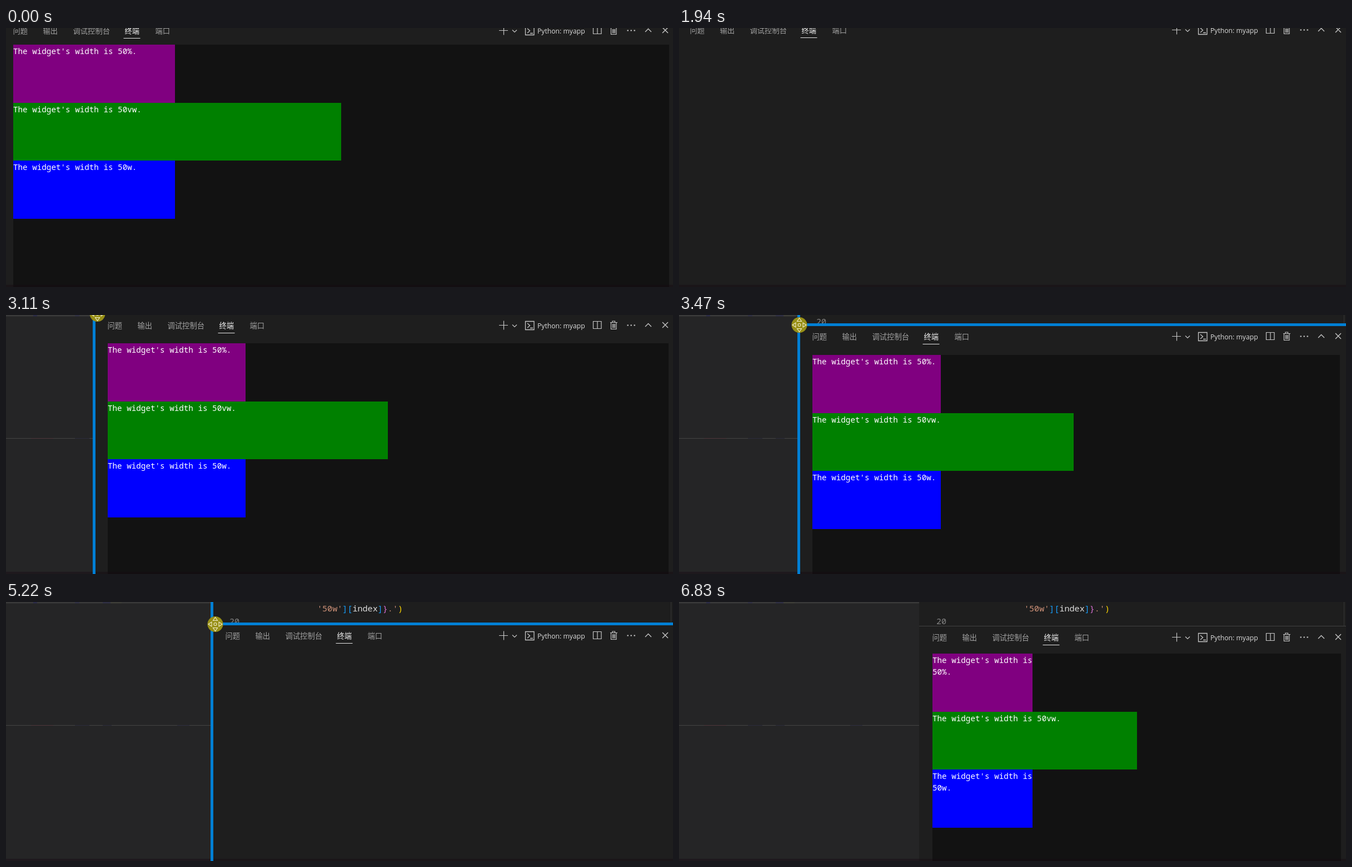
An HTML page that plays this animation: 1200x467 px, repeating every 7.89 s.

```html
<!DOCTYPE html>
<html lang="zh">
<head>
<meta charset="utf-8">
<style>
html, body { margin: 0; width: 100%; height: 100%; overflow: hidden; background: #1e1e1e; }
svg { display: block; width: 1200px; height: 467px; }
text { white-space: pre; }
.tab { font: 13.3px "Noto Sans CJK SC", "Noto Sans CJK", sans-serif; fill: #a0a0a0; }
.tab.on { fill: #f0f0f0; }
.label { font: 12.2px "Open Sans", "Noto Sans", sans-serif; fill: #dcdcdc; }
.term { font: 14.25px "Noto Sans Mono", monospace; fill: #fff; }
.code { font: 15.1px "Noto Sans Mono", monospace; fill: #dcdcdc; }
.num { fill: #858585; }
.str { fill: #ce9178; } .blue { fill: #179fff; } .pink { fill: #da70d6; } .gold { fill: #ffd700; }
.icon { fill: none; stroke: #c5c5c5; stroke-width: 1.2; }
.sash { fill: #007fd4; }
</style>
</head>
<body>
<svg viewBox="0 0 1200 467">
  <defs><clipPath id="sideClip"><rect id="sideBox" height="467"/></clipPath></defs>
  <rect width="1200" height="467" fill="#1e1e1e"/>
  <g id="side" clip-path="url(#sideClip)">
    <rect width="1200" height="467" fill="#252526"/>
  </g>
  <rect x="1196" width="1" height="60" fill="#353535"/>
  <g id="editor" class="code">
    <text id="lineNo" class="num" x="31.5">20</text>
    <text id="code" x="189.5" y="17"><tspan id="head"><tspan class="str">'50w'</tspan><tspan class="blue">]</tspan></tspan><tspan class="blue">[</tspan>index<tspan class="blue">]</tspan><tspan class="pink">}</tspan><tspan class="str">.'</tspan><tspan class="gold">)</tspan></text>
  </g>
  <g id="panel">
    <rect x=".5" width="1300" height="600" fill="#1e1e1e"/>
    <rect x=".5" width="1300" height="1" fill="#414141"/>
    <g id="tabs"></g>
    <rect x="223" y="34" width="30" height="1" fill="#e7e7e7"/>
  </g>
  <g id="tools" class="icon">
    <path d="M887 20.5h16M895.5 12.5v16M911 19.5l4 4l4-4"/>
    <path d="M934.5 13.5h15.5v15h-15.5zM938 17l4.5 4l-4.5 4M943 25.5h5" stroke-width="1.3"/>
    <path d="M1056.5 13.5h14.5v13h-14.5zM1064 13.5v13"/>
    <path d="M1087 15.5h13M1091 15v-2h4.5v2M1088.5 16v11.5h9.5v-11.5M1091.5 18v7.5M1093.5 18v7.5M1095.5 18v7.5"/>
    <path d="M1150 23l5.500-5.500l5.500 5.500M1181 15l10 10M1191 15l-10 10" stroke-width="1.4"/>
    <path d="M1117.5 20.5h2.5M1123.5 20.5h2.5M1129.5 20.5h2.5" stroke-width="2.2"/>
    <text class="label" x="956" y="26" stroke="none">Python: myapp</text>
  </g>
  <g id="term" class="term"><rect id="screen" fill="#121212"/></g>
  <rect y="463" width="1200" height="4" fill="#140810" opacity=".4"/>
  <g id="sashes" class="sash">
    <rect id="sashX" width="5" height="467"/>
    <rect id="sashY" width="1300" height="5"/>
  </g>
  <g id="cursor">
    <circle r="14" fill="#978f16"/>
    <g id="move" fill="none" stroke="#f0eccb" stroke-width="1.1">
      <circle r="2.5"/>
    </g>
    <path id="beam" d="M-3-8q3 0 3 2v12q0 2-3 2M3-8q-3 0-3 2M0 6q0 2 3 2" fill="none" stroke="#fff" stroke-width="1.2"/>
  </g>
</svg>
<script>
const LOOP = 7890, STEP = 40, CELL = 8.55, ROW = 20.93, RIGHT = 1194.5;
const $ = id => document.getElementById(id);

function add(parent, tag, attrs, text) {
  const el = document.createElementNS("http://www.w3.org/2000/svg", tag);
  set(el, attrs);
  if (text) el.textContent = text;
  return parent.appendChild(el);
}
function set(el, attrs) {
  for (const k in attrs) el.setAttribute(k, attrs[k]);
}
const show = (el, on) => el.style.display = on ? "" : "none";
const place = (el, x, y) => el.setAttribute("transform", `translate(${x} ${y})`);

// time, panel left, panel top
const DRAG = [
  [0, -11.5, -16], [1900, -11.5, -16], [1940, -5, -17], [2140, 16.5, -17],
  [2310, 16.5, -17], [2750, 57.5, -17], [3110, 158, -2], [3470, 215.5, 18],
  [4000, 215.5, 18], [4160, 298, 31], [4490, 298, 31], [4610, 327.5, 36],
  [4890, 365, 40], [5180, 365, 40], [5660, 431.5, 43], [LOOP, 431.5, 43]
];
// spans in which the terminal is cleared
const BLANK = [[1940, 2060], [2350, 2470], [2870, 2990], [3150, 3230],
  [4040, 4120], [4530, 4770], [5220, 5340]];

// content
[["问题", 0], ["输出", 54], ["调试控制台", 108], ["终端", 201], ["端口", 256]].forEach(([name, x]) =>
  add($("tabs"), "text", { class: name === "终端" ? "tab on" : "tab", x: 24 + x, y: 26 }, name));

[["#3a3a3a", 0, 49, 0], ["#2d2d48", 49, 7, 0], ["#3a3a3a", 56, 68, 0], ["#323244", 124, 8, 0],
 ["#3a3a3a", 132, 42, 0], ["#303044", 174, 14, 0], ["#3e3e38", 188, 20, 0], ["#393939", 208, 240, 0],
 ["#444", 0, 45, 222], ["#50383c", 45, 40, 222], ["#444", 85, 39, 222], ["#2c2c3c", 124, 26, 222],
 ["#444", 150, 24, 222], ["#2c2c3c", 174, 16, 222], ["#444", 190, 118, 222],
 ["#303042", 308, 22, 222], ["#444", 330, 110, 222]
].forEach(([fill, x, width, y]) => add($("side"), "rect", { fill, x, width, y, height: y ? 1 : 2.5 }));

const widgets = [["#800080", "50%."], ["#008000", "50vw."], ["#0000ff", "50w."]].map(([fill, unit]) => ({
  unit,
  box: add($("term"), "rect", { fill }),
  first: add($("term"), "text", {}),
  second: add($("term"), "text", {})
}));

for (let a = 0; a < 360; a += 90)
  add($("move"), "path", { d: "M0-12.5l4 6h-8z", transform: `rotate(${a})` });

function panelAt(t) {
  let i = 0;
  while (i < DRAG.length - 2 && t >= DRAG[i + 1][0]) i++;
  const [a, x0, y0] = DRAG[i], [b, x1, y1] = DRAG[i + 1];
  const k = Math.floor((t - a) / STEP) * STEP / (b - a);
  const wasMoving = i > 0 && DRAG[i - 1][1] !== x0;
  return {
    x: Math.round(x0 + (x1 - x0) * k - 2.5) + 2.5,
    y: Math.round(y0 + (y1 - y0) * k),
    moving: x0 !== x1 && (k > 0 || wasMoving)
  };
}

function curve(t, a, b, p, q, r) {
  let k = Math.min(1, Math.floor((t - a) / STEP) * STEP / (b - a));
  k = k * k * (3 - 2 * k);
  return [0, 1].map(i => p[i] * (1 - k) ** 2 + 2 * q[i] * k * (1 - k) + r[i] * k * k);
}

function cursorAt(t, panel) {
  if (t < 210 || t >= 6790) return [835, -40];
  if (t < 1010) return curve(t, 210, 1010, [835, -16], [420, 596], [26, 28]);
  if (t < 1290) return curve(t, 1010, 1290, [26, 28], [6, 5], [-11, -17]);
  // the pointer leads the sash while dragging
  if (t < 6030) return [panel.x + (panel.moving ? 6 : 1), panel.y];
  return curve(t, 5990, 6790, [432, 43], [600, 200], [835, -16]);
}

function drawTerm(panel) {
  const x = Math.round(panel.x + 24);
  const top = 30 + 21 * Math.max(0, Math.ceil((panel.y + 46 - 30) / 21));
  const cols = Math.floor((RIGHT - x) / CELL);
  const half = Math.floor(cols / 2), quarter = Math.floor(half / 2);
  set($("screen"), { x, y: top, width: Math.round(cols * CELL), height: 467 });
  widgets.forEach((w, i) => {
    const span = i === 1 ? half : quarter;
    const y = Math.round(top + i * 5 * ROW), end = Math.round(top + (i + 1) * 5 * ROW);
    const lead = "The widget's width is", line = lead + " " + w.unit;
    const fits = line.length <= span;
    set(w.box, { x, y, width: Math.round(span * CELL), height: end - y });
    set(w.first, { x, y: y + 17 });
    set(w.second, { x, y: y + 38 });
    w.first.textContent = fits ? line : lead;
    w.second.textContent = fits ? "" : w.unit;
  });
}

function draw(t) {
  const panel = panelAt(t), { x, y } = panel;
  set($("sideBox"), { width: Math.max(0, x + .5) });
  place($("editor"), x, 0);
  place($("panel"), x, y);
  place($("tools"), 0, y);

  const wrapped = x > 270;
  set($("lineNo"), { y: wrapped ? 40 : 17 });
  show($("code"), wrapped);
  show($("head"), x > 350);

  const blank = BLANK.some(([a, b]) => t >= a && t < b);
  show($("term"), !blank);
  if (!blank) drawTerm(panel);

  show($("sashes"), t >= 1290 && t < 6110);
  set($("sashX"), { x: x - 2.5 });
  set($("sashY"), { x: x - 2.5, y: y - 3 });

  place($("cursor"), ...cursorAt(t, panel));
  const resizing = t >= 1250 && t < 6070;
  show($("move"), resizing);
  show($("beam"), !resizing);
}

const start = performance.now();
function tick() {
  draw((performance.now() - start) % LOOP);
  requestAnimationFrame(tick);
}
tick();
</script>
</body>
</html>
```
